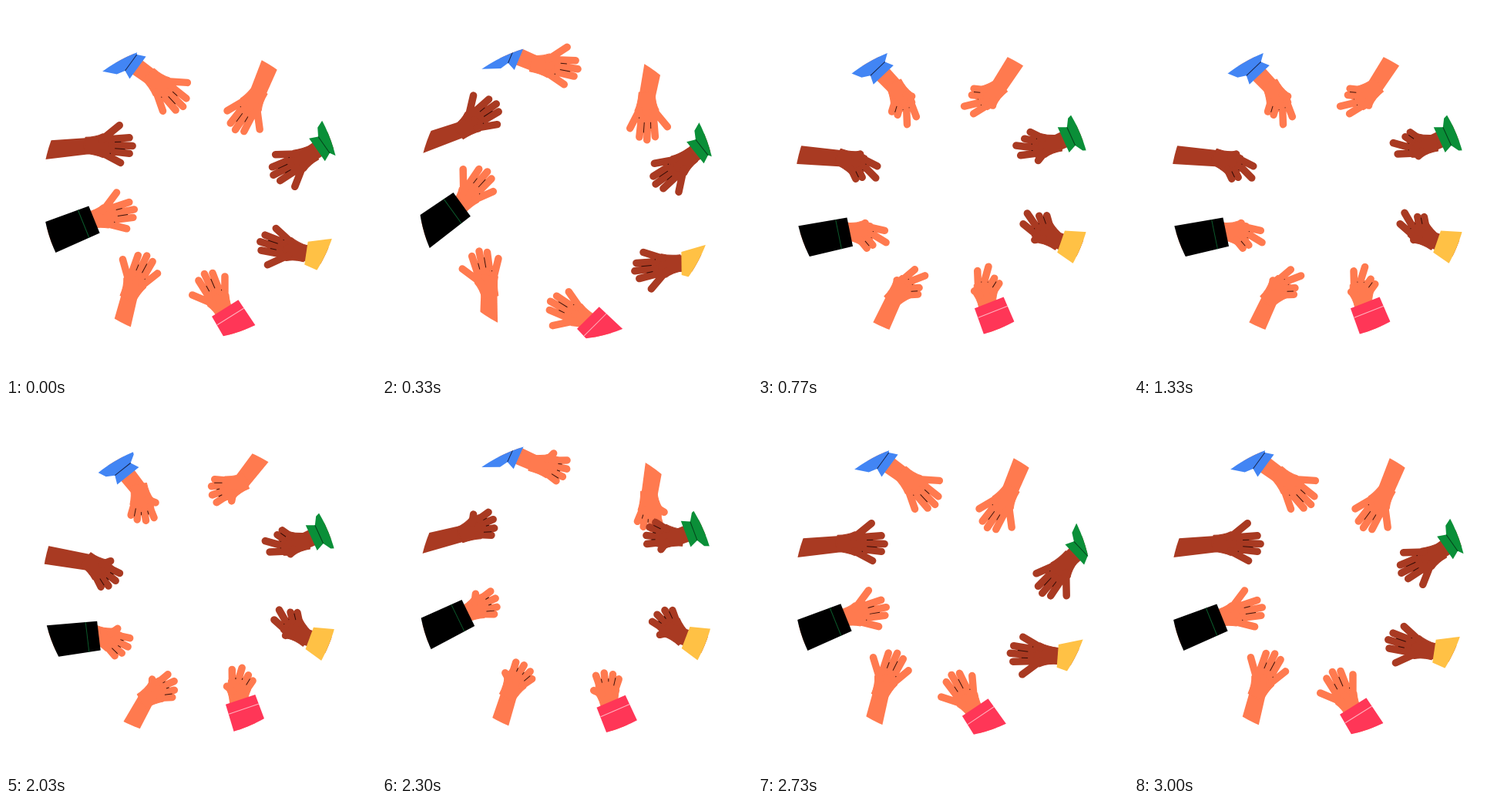
Recreate the animation shown at these times as an HTML page. Size 480x480 px, loop 3.03 s.

```html
<!DOCTYPE html>
<html lang="en">
<head>
<meta charset="utf-8">
<title>Rock, paper, scissors</title>
<style>
  html, body { margin: 0; width: 100%; height: 100%; overflow: hidden; background: #fff; }
  svg { display: block; width: 100%; height: 100%; }
</style>
</head>
<body>
<svg id="stage" viewBox="0 0 480 480">
  <clipPath id="ring"><circle cx="240" cy="240" r="193"/></clipPath>
</svg>
<script>
const LOOP = 3030, LAG = 30, FOREARM = 92;
const ORANGE = '#ff7a4f', BROWN = '#a93a22';

// Sleeve shapes, along the arm from the elbow; "at" is the front edge.
const bell = at => `M${at} -18L${at - 11} -13L${at - 17} -23L-30 -60V60L${at - 17} 23L${at - 11} 13L${at} 18Z`;
const flare = at => `M${at} -15L${at - 25} -22L-30 -46V46L${at - 25} 22L${at} 15Z`;
const tube = (at, top, bottom) => `M${at} ${top}L-30 ${top - 4}V${bottom + 4}L${at} ${bottom}Z`;
const fold = (x, top, bottom) => `M${x} ${top}V${bottom}`;

// Counterclockwise from the top right, in the order they move.
const people = [
  { x: 361, y: 30, arm: 123, wrist: 21, skin: ORANGE },
  { x: 116, y: 40, arm: 46.5, wrist: 18.5, skin: ORANGE,
    sleeve: bell(68), color: '#4285f4', fold: fold(57, -13, 13), line: '#17264f' },
  { x: 19, y: 190, arm: 5, wrist: 17.5, skin: BROWN },
  { x: 29, y: 311, arm: -11.5, wrist: 20, skin: ORANGE,
    sleeve: tube(92, -18.5, 19.5), color: '#000', fold: fold(77, -19, 20), line: '#0b5a2b' },
  { x: 138, y: 462, arm: 295, wrist: 21, skin: ORANGE },
  { x: 331, y: 473, arm: 248.5, wrist: 16, skin: ORANGE,
    sleeve: tube(93.5, -17, 23.5), color: '#ff3657', fold: fold(80.5, -17, 24), line: '#ffb3bf' },
  { x: 472.5, y: 333, arm: 199, wrist: 18, skin: BROWN,
    sleeve: flare(84), color: '#ffc145' },
  { x: 469, y: 140.5, arm: 155.5, wrist: 17.5, skin: BROWN,
    sleeve: bell(80), color: '#0a8f38', fold: fold(69, -13, 13), line: '#053f1a' }
];

// Fingers from thumb to little finger, in hand space.
const ROOTS = [[13, -8], [23, -9.5], [27, -2], [24, 6], [15, 9]];
const PAPER = [[35.5, -28], [49, -12.5], [53.5, -2], [50, 8], [39, 20.5]];
const SCISSORS = [[18, -14], [44.5, -8], [48.5, 7], [32, 13], [25, 18]];
const ROCK = [[19, -18], [38, -13], [40, -2], [37, 9], [30, 16]];
const PALM = 'M-8 -10.5Q5 -11 14 -16L27 -14.5L33 -2L29 10L16 15Q6 11 -8 10.5Z';

// Local time: 0 is the start of the first move away from scissors.
const SWING = [
  // time, arm turn, hand turn
  [0, 0, 0], [150, 5, 16], [190, 5, 16], [530, -24.5, -58], [560, -24.5, -58],
  [840, -10.5, -20], [1250, -10.5, -20], [1430, -24.5, -58], [1440, -24.5, -58], [1750, 0, 0]
];
const GRIP = [
  [0, SCISSORS], [150, ROCK], [400, ROCK], [660, PAPER], [1590, PAPER], [1900, SCISSORS]
];

const mix = (a, b, k) => a + (b - a) * k;
const clamp = (v, lo, hi) => Math.min(hi, Math.max(lo, v));
const inOut = k => k < .5 ? 4 * k ** 3 : 1 - 4 * (1 - k) ** 3;
const out = k => 1 - (1 - k) ** 2;

function span(keys, t) {
  let i = 0;
  while (i < keys.length - 2 && t >= keys[i + 1][0]) i++;
  const a = keys[i], b = keys[i + 1];
  const k = clamp((t - a[0]) / (b[0] - a[0]), 0, 1);
  return [a, b, i === 0 ? out(k) : inOut(k)];
}

function add(parent, tag, attrs = {}) {
  const node = document.createElementNS('http://www.w3.org/2000/svg', tag);
  for (const name in attrs) node.setAttribute(name, attrs[name]);
  return parent.appendChild(node);
}

const scene = add(document.getElementById('stage'), 'g', { 'clip-path': 'url(#ring)' });

for (const p of people) {
  p.root = add(scene, 'g');
  add(p.root, 'path', { d: `M-40 -14L${FOREARM} -10.5V10.5L-40 14Z`, fill: p.skin });
  p.hand = add(p.root, 'g');
  add(p.hand, 'circle', { r: 10.5, fill: p.skin });
  add(p.hand, 'path', { d: PALM, fill: p.skin, stroke: p.skin, 'stroke-linejoin': 'round' });
  p.fingers = add(p.hand, 'path', {
    fill: 'none', stroke: p.skin, 'stroke-width': 9.5, 'stroke-linecap': 'round'
  });
  p.gaps = add(p.hand, 'path', {
    fill: 'none', stroke: p.skin === BROWN ? '#300a05' : '#3a1109', 'stroke-width': 1
  });
  if (p.sleeve) add(p.root, 'path', { d: p.sleeve, fill: p.color });
  if (p.fold) add(p.root, 'path', { d: p.fold, stroke: p.line, 'stroke-width': 1 });
}

const between = (a, b, k) => [mix(a[0], b[0], k), mix(a[1], b[1], k)];
const gapSize = (a, b) => Math.hypot(a[0] - b[0], a[1] - b[1]);

// Crease between two neighbours, ending where they part.
function crease(tips, i) {
  const near = gapSize(ROOTS[i], ROOTS[i + 1]);
  const far = gapSize(tips[i], tips[i + 1]);
  const end = far > near ? clamp((10 - near) / (far - near), .25, .9) : .9;
  const a = between(ROOTS[i], ROOTS[i + 1], .5);
  const b = between(tips[i], tips[i + 1], .5);
  return `M${between(a, b, .2)}L${between(a, b, end)}`;
}

function draw(time) {
  people.forEach((p, i) => {
    const t = (time - 1830 - i * LAG + 2 * LOOP) % LOOP;
    const [a, b, k] = span(SWING, t);
    const arm = mix(a[1], b[1], k), hand = mix(a[2], b[2], k);
    p.root.setAttribute('transform', `translate(${p.x} ${p.y}) rotate(${p.arm + arm})`);
    p.hand.setAttribute('transform', `translate(${FOREARM} 0) rotate(${p.wrist + hand - arm})`);

    const [from, to, grip] = span(GRIP, t);
    const tips = from[1].map((tip, n) => between(tip, to[1][n], grip));
    p.fingers.setAttribute('d', tips.map((tip, n) => `M${ROOTS[n]}L${tip}`).join(''));
    p.gaps.setAttribute('d', [1, 2, 3].map(n => crease(tips, n)).join(''));
  });
}

function tick() {
  draw(performance.now() % LOOP);
  requestAnimationFrame(tick);
}
tick();
</script>
</body>
</html>
```
